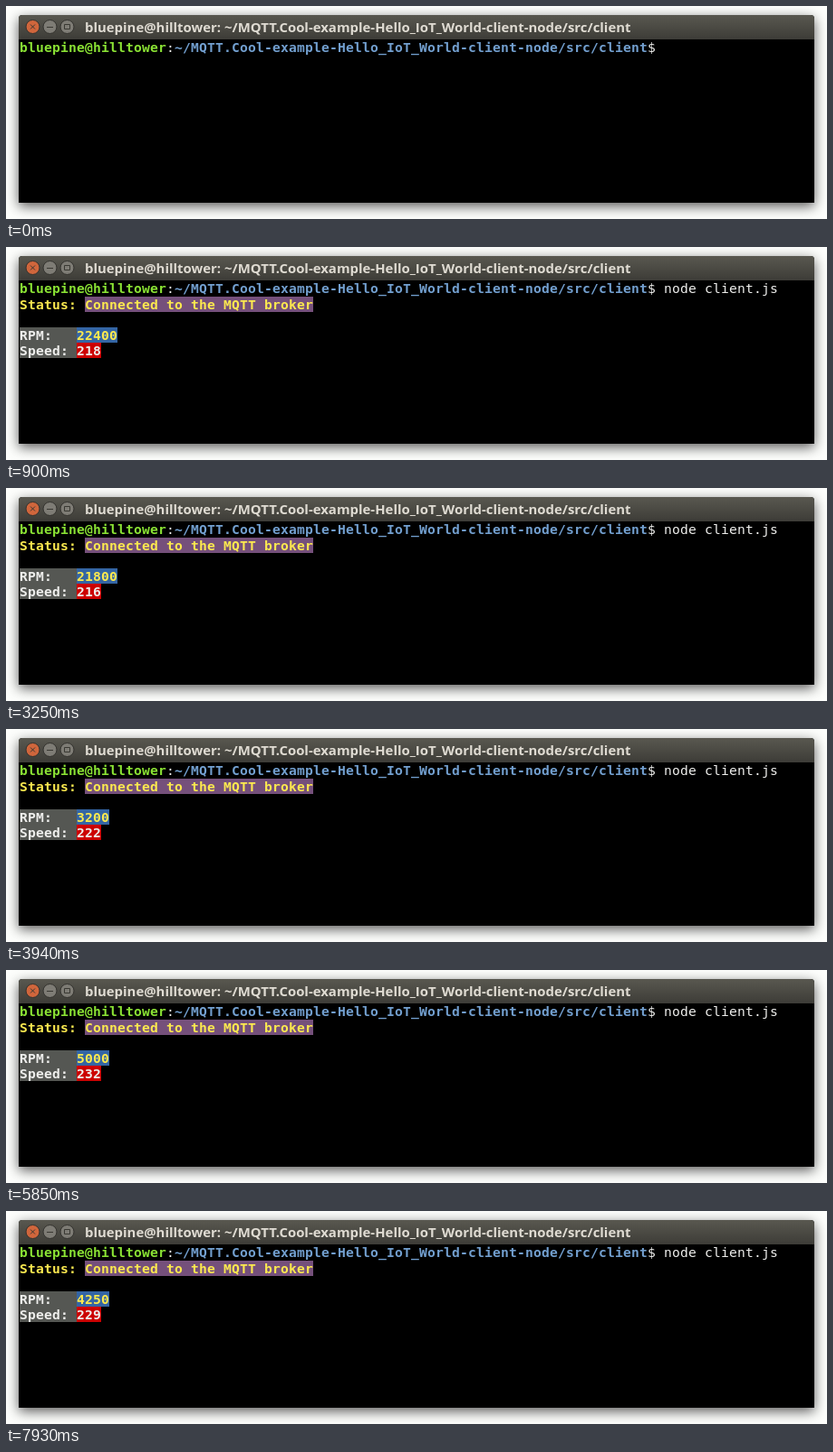
Animation of 906 by 236 pixels, one loop 8000 ms. Source, as an HTML page with a canvas:

```html
<!DOCTYPE html>
<html lang="en">
<head>
<meta charset="utf-8">
<title>Terminal telemetry</title>
<style>
  html, body { margin: 0; width: 100%; height: 100%; overflow: hidden; background: #fdfefc; }
  canvas { display: block; }
</style>
</head>
<body>
<canvas id="stage" width="906" height="236"></canvas>
<script>
const ctx = document.getElementById('stage').getContext('2d');
const LOOP = 8000;
const COMMAND_AT = 190, STATUS_AT = 440, CONNECTED_AT = 589, TICK = 101;
const CELL = 9, ROW = 17, LEFT = 15, PROMPT_Y = 37, PANEL_Y = 55;
const USER = 'bluepine@hilltower';
const PATH = '~/MQTT.Cool-example-Hello_IoT_World-client-node/src/client';
const MONO = '14.67px "DejaVu Sans Mono", monospace';

const COLOR = {
  paper: '#fdfefc', white: '#eeeeec', green: '#8ae234', blue: '#729fcf', yellow: '#fce94f',
  bgGrey: '#555753', bgBlue: '#3465a4', bgRed: '#cc0000', bgPurple: '#75507b'
};

// Key readings: tick, rpm, speed.
const keys = [
  [0, 22900, 217], [3, 22400, 218], [11, 22100, 217], [26, 21800, 216],
  [27, 2150, 216], [40, 4500, 230], [52, 5000, 232], [68, 3950, 228], [72, 4250, 229]
];

// Interpolates the keys, with a ripple that vanishes at each key.
function readAt(tick) {
  const i = keys.findLastIndex(key => key[0] <= tick);
  const a = keys[i], b = keys[i + 1] || a;
  const k = b === a ? 0 : (tick - a[0]) / (b[0] - a[0]);
  const ripple = Math.sin(k * Math.PI * 4);
  const mix = (j, swing) => (a[j] + (b[j] - a[j]) * k) * (1 + swing * ripple);
  const step = a[1] > 9999 ? 100 : 50;
  return { rpm: Math.round(mix(1, 0.015) / step) * step, speed: Math.round(mix(2, 0.004)) };
}

// Writes text on the character grid.
function put(col, y, text, color, { bold = true, bg } = {}) {
  const x = LEFT + col * CELL;
  if (bg) {
    ctx.fillStyle = bg;
    ctx.fillRect(x, y, text.length * CELL, ROW);
  }
  ctx.font = (bold ? 'bold ' : '') + MONO;
  ctx.fillStyle = color;
  [...text].forEach((ch, i) => ctx.fillText(ch, x + i * CELL, y + 14));
}

function button(x, fill, mark) {
  const y = 23;
  ctx.beginPath();
  ctx.arc(x, y, 7.5, 0, Math.PI * 2);
  ctx.fillStyle = fill;
  ctx.fill();
  ctx.strokeStyle = '#33322e';
  ctx.lineWidth = 1;
  ctx.stroke();
  ctx.beginPath();
  mark(x, y);
  ctx.strokeStyle = '#393832';
  ctx.stroke();
}

function panel(height, fill, radii) {
  ctx.beginPath();
  ctx.roundRect(14, 10, 878, height, radii);
  ctx.fillStyle = fill;
  ctx.fill();
}

function drawWindow() {
  const corners = [4, 4, 0, 0];
  ctx.fillStyle = COLOR.paper;
  ctx.fillRect(0, 0, 906, 236);
  ctx.save();
  ctx.shadowColor = 'rgba(0,0,0,.65)';
  ctx.shadowBlur = 14;
  ctx.shadowOffsetY = 4;
  panel(208, '#000', corners);
  ctx.restore();

  const bar = ctx.createLinearGradient(0, 10, 0, 37);
  bar.addColorStop(0, '#595850');
  bar.addColorStop(1, '#3d3c37');
  panel(27, bar, corners);

  button(29.5, '#d0663c', (x, y) => {
    ctx.moveTo(x - 2.5, y - 2.5); ctx.lineTo(x + 2.5, y + 2.5);
    ctx.moveTo(x + 2.5, y - 2.5); ctx.lineTo(x - 2.5, y + 2.5);
  });
  button(48.5, '#7e7c75', (x, y) => {
    ctx.moveTo(x - 3.5, y + 0.5); ctx.lineTo(x + 3.5, y + 0.5);
  });
  button(67.5, '#7e7c75', (x, y) => ctx.rect(x - 3, y - 2.5, 6, 5));

  ctx.font = 'bold 14.93px "Open Sans", sans-serif';
  ctx.fillStyle = '#dfdbd2';
  ctx.fillText(USER + ': ' + PATH, 87, 29);
}

function drawPrompt(t) {
  put(0, PROMPT_Y, USER, COLOR.green);
  put(18, PROMPT_Y, ':', COLOR.white, { bold: false });
  put(19, PROMPT_Y, PATH, COLOR.blue);
  const command = t < COMMAND_AT ? '$' : '$ node client.js';
  put(77, PROMPT_Y, command, COLOR.white, { bold: false });
}

function drawReading(row, label, value, color, bg) {
  const y = PANEL_Y + row * ROW;
  put(0, y, label.padEnd(7), COLOR.white, { bg: COLOR.bgGrey });
  put(7, y, String(value), color, { bg });
}

function draw(t) {
  drawWindow();
  drawPrompt(t);
  if (t < STATUS_AT) return;

  const status = t < CONNECTED_AT ? 'Connecting to the broker..' : 'Connected to the MQTT broker';
  put(0, PANEL_Y, 'Status:', COLOR.yellow);
  put(8, PANEL_Y, status, COLOR.yellow, { bg: COLOR.bgPurple });

  const tick = Math.floor((t - CONNECTED_AT) / TICK);
  if (tick < 1) return;
  const { rpm, speed } = readAt(tick);
  drawReading(2, 'RPM:', rpm, COLOR.yellow, COLOR.bgBlue);
  drawReading(3, 'Speed:', speed, COLOR.white, COLOR.bgRed);
}

const start = performance.now();
function frame() {
  draw((performance.now() - start) % LOOP);
  requestAnimationFrame(frame);
}
frame();
</script>
</body>
</html>
```
